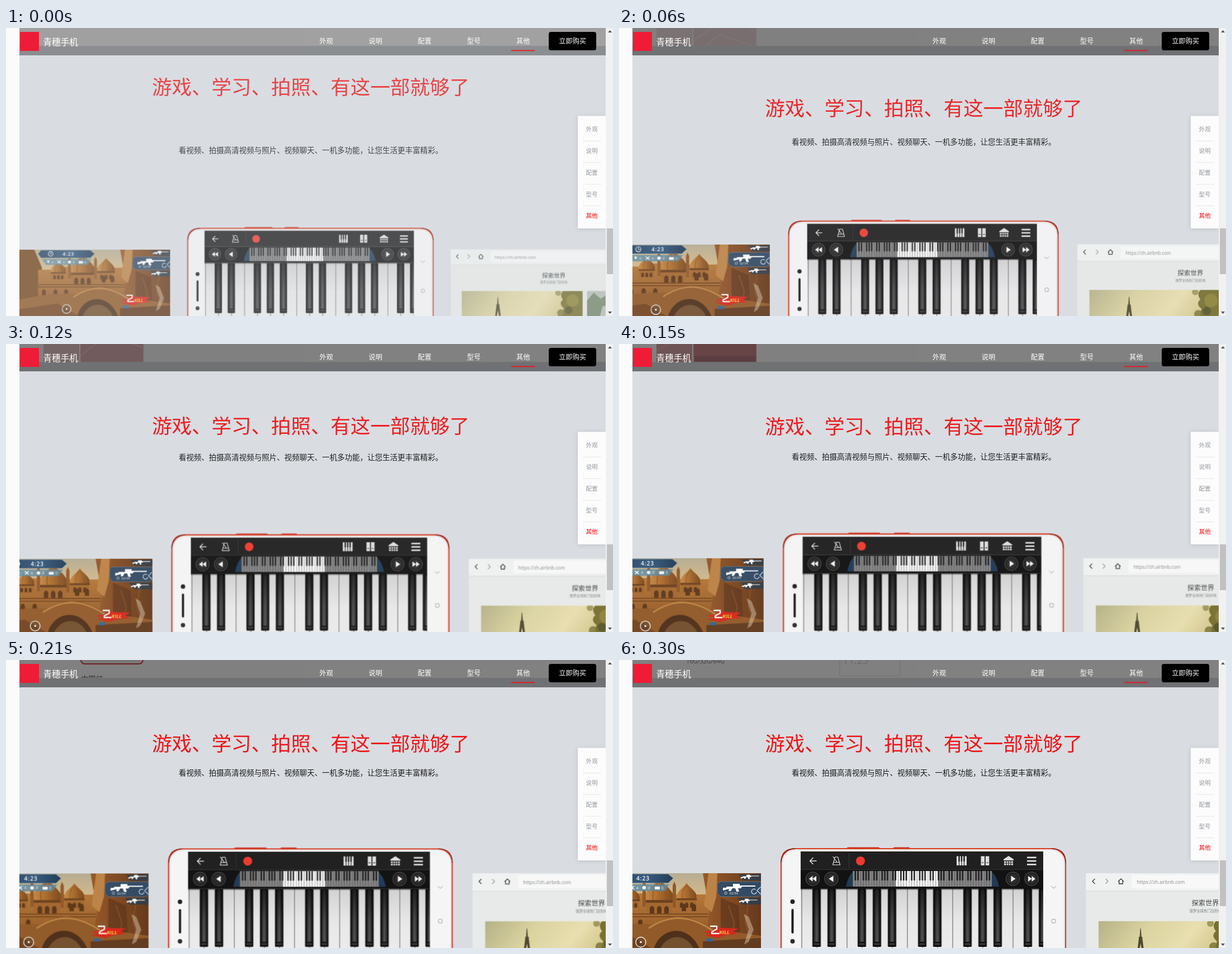
An HTML page that plays this animation: 1086 px wide and 516 px high, repeating every 330 ms.

```html
<!DOCTYPE html>
<html lang="zh-CN">
<head>
<meta charset="utf-8">
<title>手机介绍页</title>
<style>
html, body { margin: 0; width: 100%; height: 100%; overflow: hidden; background: #fbfbfb; }
svg { display: block; width: 1086px; height: 516px; }
text { font-family: "Noto Sans CJK SC", "Noto Sans CJK", "Noto Sans", sans-serif; }
.mid { text-anchor: middle; }
.nav { font-size: 12.2px; font-weight: 500; fill: #fff; }
.side { font-size: 10.5px; fill: #93989e; }
.latin { font-family: "Open Sans", "Noto Sans", sans-serif; }
.line { fill: none; stroke-linecap: round; stroke-linejoin: round; }

/* eleven held poses of 30 ms each */
.title, .sub, .devices, .shade, .past, .next { animation: 330ms step-end infinite; }
.title { animation-name: fade, title; }
.sub { animation-name: fade, sub; }
.devices { animation-name: fade, grow; transform-origin: 544.75px 490px; }
.shade { animation-name: shade; }
.past { animation-name: past; }
.next { animation-name: next; }

@keyframes fade {
  0% { opacity: .76 } 9.0909% { opacity: .83 } 18.1818% { opacity: .91 }
  27.2727% { opacity: .935 } 36.3636% { opacity: .955 } 45.4545% { opacity: .972 }
  54.5454% { opacity: .985 } 63.6363% { opacity: .995 } 72.7272%, 100% { opacity: 1 }
}
@keyframes title {
  0% { transform: translateY(-44px) } 9.0909% { transform: translateY(-12px) }
  18.1818% { transform: translateY(-6px) } 27.2727% { transform: translateY(-4.3px) }
  36.3636% { transform: translateY(-3px) } 45.4545% { transform: translateY(-1.9px) }
  54.5454% { transform: translateY(-1px) } 63.6363% { transform: translateY(-.4px) }
  72.7272%, 100% { transform: none }
}
@keyframes sub {
  0% { transform: translateY(17px) } 9.0909% { transform: translateY(4.7px) }
  18.1818% { transform: translateY(2.3px) } 27.2727% { transform: translateY(1.7px) }
  36.3636% { transform: translateY(1.2px) } 45.4545% { transform: translateY(.7px) }
  54.5454% { transform: translateY(.4px) } 63.6363% { transform: translateY(.2px) }
  72.7272%, 100% { transform: none }
}
@keyframes grow {
  0% { transform: scale(.863) } 9.0909% { transform: scale(.892) }
  18.1818% { transform: scale(.947) } 27.2727% { transform: scale(.962) }
  36.3636% { transform: scale(.974) } 45.4545% { transform: scale(.984) }
  54.5454% { transform: scale(.992) } 63.6363% { transform: scale(.997) }
  72.7272%, 100% { transform: scale(1) }
}
@keyframes shade {
  0% { opacity: .36 } 9.0909%, 100% { opacity: .49 }
}
@keyframes past {
  0%, 9.0909% { opacity: 0; transform: translateY(110px) }
  18.1818% { opacity: .16; transform: translateY(100px) }
  27.2727% { opacity: .24; transform: translateY(87px) }
  36.3636% { opacity: .34; transform: translateY(72px) }
  45.4545% { opacity: .55; transform: translateY(52px) }
  54.5454% { opacity: .78; transform: translateY(31px) }
  63.6363% { opacity: .9; transform: translateY(8px) }
  72.7272% { opacity: 1; transform: translateY(-15px) }
  81.8181% { opacity: 1; transform: translateY(-30px) }
  90.909%, 100% { opacity: 1; transform: translateY(-42px) }
}
@keyframes next {
  0% { opacity: 0 } 81.8181% { opacity: .5 } 90.909%, 100% { opacity: 1 }
}
</style>
</head>
<body>
<svg viewBox="0 0 1086 516">
<defs>
  <clipPath id="page"><path d="M24 32H1073V516H24z"/></clipPath>
  <clipPath id="above"><path d="M24 0H1073V32H24z"/></clipPath>
  <clipPath id="gameBox"><path d="M-70 382H254V580H-70z"/></clipPath>
  <clipPath id="photoBox"><path d="M858 468H1109V580H858z"/></clipPath>
  <linearGradient id="ebony">
    <stop offset="0" stop-color="#111"/><stop offset=".25" stop-color="#3a3a3a"/>
    <stop offset=".5" stop-color="#585858"/><stop offset=".75" stop-color="#3a3a3a"/>
    <stop offset="1" stop-color="#111"/>
  </linearGradient>
  <linearGradient id="ebonyTop" x2="0" y2="1">
    <stop offset="0" stop-color="#000" stop-opacity=".6"/><stop offset=".6" stop-color="#000" stop-opacity=".1"/>
    <stop offset="1" stop-color="#000" stop-opacity="0"/>
  </linearGradient>
  <linearGradient id="ivory" x2="0" y2="1">
    <stop offset="0" stop-color="#d2d2d3"/><stop offset=".3" stop-color="#e8e8e9"/>
    <stop offset="1" stop-color="#f2f2f2"/>
  </linearGradient>
  <linearGradient id="sky" x2="0" y2="1">
    <stop offset="0" stop-color="#b7ad92"/><stop offset=".2" stop-color="#d3b98a"/><stop offset=".4" stop-color="#b98144"/>
  </linearGradient>
  <linearGradient id="town" x2="0" y2="1">
    <stop offset="0" stop-color="#b57839"/><stop offset="1" stop-color="#8a5124"/>
  </linearGradient>
  <linearGradient id="domeFill">
    <stop offset="0" stop-color="#c58a48"/><stop offset=".4" stop-color="#b0702f"/><stop offset="1" stop-color="#7d4a20"/>
  </linearGradient>
  <linearGradient id="cliff">
    <stop offset="0" stop-color="#96592a"/><stop offset="1" stop-color="#66391b"/>
  </linearGradient>
  <linearGradient id="hud">
    <stop offset="0" stop-color="#2a4560"/><stop offset=".6" stop-color="#365a7e"/><stop offset="1" stop-color="#243c56"/>
  </linearGradient>
  <linearGradient id="dusk" y2=".35">
    <stop offset="0" stop-color="#b5b288"/><stop offset=".35" stop-color="#dbd3a0"/>
    <stop offset=".65" stop-color="#e9dfb0"/><stop offset="1" stop-color="#c8bb7c"/>
  </linearGradient>
  <g id="blackKey">
    <rect width="15" height="104" rx="1.5" fill="#0c0c0c"/>
    <rect x="2" width="11" height="95" rx="1.5" fill="url(#ebony)"/>
    <rect x="2" width="11" height="95" fill="url(#ebonyTop)"/>
    <path d="M2.5 97H12.5V101H2.5z" fill="#333"/>
  </g>
  <pattern id="octave" x="326.5" y="410" width="189" height="200" patternUnits="userSpaceOnUse">
    <rect width="189" height="200" fill="url(#ivory)"/>
    <path d="M.5 0V200M27.5 0V200M54.5 0V200M81.5 0V200M108.5 0V200M135.5 0V200M162.5 0V200" stroke="#58585a"/>
    <use href="#blackKey" x="19.5"/><use href="#blackKey" x="46.5"/>
    <use href="#blackKey" x="100.5"/><use href="#blackKey" x="127.5"/><use href="#blackKey" x="154.5"/>
  </pattern>
  <pattern id="smallOctave" x="418" y="378" width="33.6" height="40" patternUnits="userSpaceOnUse">
    <path d="M.2 0V40M4.8 0V40M9.6 0V40M14.4 0V40M19.2 0V40M24 0V40M28.8 0V40" stroke="#333" stroke-width=".6"/>
    <path d="M4.8 0V17M9.6 0V17M19.2 0V17M24 0V17M28.8 0V17" stroke="#181818" stroke-width="2.5"/>
  </pattern>
  <g id="knob">
    <circle r="12" fill="#1b1b1b" stroke="#444" stroke-width="1.6"/><circle r="9.5" fill="#2c2c2c"/>
  </g>
  <path id="rifle" d="M0 3H6V1H18V-4H30V-1H58V1H34L32 4H27L29 10H24L22 4H17L14 9H10L11 5L0 8z"/>
  <g id="dome">
    <path d="M-24 22C-31 4-10-4 0-19C10-4 31 4 24 22z" fill="url(#domeFill)"/>
    <path d="M-26 20H26V25H-26z" fill="#6e421f"/><path d="M-23 25H23V46H-23z" fill="#a4682f"/>
    <path d="M-11 20Q-14 2-1-12M11 20Q14 2 1-12" class="line" stroke="#8a5426" stroke-width="1.4"/>
    <path d="M-17 44V34Q-13 27-9 34V44M-4 44V34Q0 27 4 34V44M9 44V34Q13 27 17 34V44" fill="#5f381b"/>
  </g>
</defs>

<rect width="1086" height="516" fill="#fbfbfb"/>
<g clip-path="url(#above)">
  <g class="past">
    <rect x="67" y="-160" width="64" height="152" fill="#bd5f63"/>
    <path d="M67-40L131-74M67-80L131-130" stroke="#dc9792"/>
    <rect x="134" y="-200" width="111" height="199" rx="7" fill="#eceaea" stroke="#d62a30" stroke-width="2"/>
    <rect x="135" y="-190" width="109" height="159" fill="#a5252c"/>
    <path d="M135-52L180-88L244-66M135-78L195-120L244-92" class="line" stroke="#e58a74" stroke-width="1.4"/>
    <rect x="135" y="-31" width="109" height="21" fill="#78131f"/>
    <path d="M139-20H146V-15H139zM231-20H238V-15H231z" fill="#ddd"/>
    <text x="188" y="-15" class="mid" font-size="5" fill="#ddd">手机</text>
    <text x="154" y="31" class="mid" font-size="13.3" fill="#555">中国红</text>
    <text x="154.5" y="48" class="mid latin" font-size="10.8" fill="#777">16G/32G/64G</text>
  </g>
  <g class="next">
    <path d="M395 0V28H503V0" fill="none" stroke="#d8d8d8"/>
    <text x="423" y="7" class="mid latin" font-size="18" fill="#cfcfcf">11:23</text>
  </g>
</g>

<g clip-path="url(#page)">
  <path d="M24 32H1073V516H24z" fill="#d9dde2"/>
  <text class="title mid" x="545.2" y="163" font-size="35.5" fill="#f01416">游戏、学习、拍照、有这一部就够了</text>
  <text class="sub" x="309" y="206.5" font-size="13.5" fill="#161616">看视频、拍摄高清视频与照片、视频聊天、一机多功能，让您生活更丰富精彩。</text>

  <g class="devices">
    <!-- game -->
    <g clip-path="url(#gameBox)">
      <path d="M-70 382H254V580H-70z" fill="url(#sky)"/>
      <path d="M-70 382H-28L-12 420L-18 470L-30 520H-70z" fill="#76481f"/>
      <path d="M-20 424H10V418H46V426H100V420H170V520H-20z" fill="url(#town)"/>
      <use href="#dome" transform="translate(22 417) scale(.6)"/>
      <use href="#dome" transform="translate(121 413) scale(.7)"/>
      <use href="#dome" x="72" y="410"/>
      <path d="M42 402L45 396L48 402V442H42zM96 404L99 397L102 404V444H96z" fill="#94592a"/>
      <path d="M-20 455H160M-20 460H160" stroke="#6f421e" stroke-width="1.6"/>
      <path d="M-12 478V468Q-8 461-4 468V478M12 478V468Q16 461 20 468V478M34 478V468Q38 461 42 468V478M112 450V440Q116 433 120 440V450M130 450V440Q134 433 138 440V450" fill="#5f381b"/>
      <path d="M150 382H254V580H160L154 500L162 450z" fill="url(#cliff)"/>
      <path d="M160 382H176L174 424L166 452L152 440z" fill="#bd8346"/>
      <path d="M182 426L214 440L218 520H182z" fill="#57311a" opacity=".55"/>
      <path d="M196 440L206 470L200 520M232 430L226 470L240 520" class="line" stroke="#935d31" stroke-width="2" opacity=".6"/>
      <path d="M-70 488C0 474 20 472 60 474C100 450 130 458 170 482L254 494V580H-70z" fill="#925a29"/>
      <path d="M54 480C96 452 134 460 172 488" class="line" stroke="#bd8344" stroke-width="3"/>
      <path d="M60 528C66 476 130 466 148 528z" fill="#4f301a"/>
      <path d="M70 528C78 490 124 482 138 528z" fill="#73502e"/>
      <path d="M-70 508L20 494L64 520V580H-70z" fill="#75441f"/>
      <path d="M150 504L254 498V580H150z" fill="#633b1f"/>
      <path d="M150 487L168 484L172 478L186 480L214 481L204 486L212 491L190 493L176 498L152 493L166 490z" fill="#d8281c"/>
      <path d="M164 477H175V482L166 487V490H178" class="line" stroke="#fff" stroke-width="2.4"/>
      <text x="179" y="491" font-size="9.5" font-weight="700" font-style="italic" fill="#ffc33a" class="latin">KILL</text>
      <path d="M156 499H168V504H156z" fill="#33679a"/>
      <path d="M223 455L232 460L241 483L232 505L224 510L232 483z" fill="#e0d0b6" opacity=".45"/>
      <circle cx="39" cy="505.5" r="9" fill="#4b3a2c" fill-opacity=".4" stroke="#fff" stroke-width="1.3"/>
      <circle cx="39" cy="505.5" r="1.8" fill="#fff"/>
      <path d="M-20 391L-14 383.5H88L97 391L88 399.5H-14z" fill="url(#hud)" stroke="#7d9ab0" stroke-width=".6"/>
      <circle cx="6" cy="391" r="4.8" fill="none" stroke="#fff" stroke-width="1.2"/>
      <path d="M6 388V391.5H8.5" class="line" stroke="#fff"/>
      <text x="43" y="395" class="mid latin" font-size="10.2" font-weight="600" letter-spacing="1" fill="#fff">4:23</text>
      <path d="M-12 402H90L82 414H-4z" fill="#5e8ba4" opacity=".8"/>
      <g fill="#f3f6f6">
        <path d="M-2 405H4L1 411zM64 406H73V411H64z"/><path d="M20 405L27 411M27 405L20 411" stroke="#fff" stroke-width="1.6"/>
        <circle cx="45" cy="408" r="3.2"/>
        <text class="latin" font-size="6.5" y="410.5"><tspan x="8">0</tspan><tspan x="31">4</tspan><tspan x="52">0</tspan><tspan x="76">0</tspan></text>
      </g>
      <path d="M214 384H254V395H222zM212 426H254V438H220z" fill="#263d52" opacity=".75"/>
      <path d="M176 401L181 397H254V420L249 424H182L176 418z" fill="#2d4c6b" opacity=".9" stroke="#7895ab" stroke-width=".6"/>
      <g fill="#fff">
        <use href="#rifle" transform="translate(186 405)"/>
        <use href="#rifle" transform="translate(218 387) scale(.56)"/>
        <use href="#rifle" transform="translate(215 430) scale(.56)"/>
        <text x="197" y="420" font-size="6" class="latin">32/34</text>
      </g>
      <path d="M244 411A4.5 4.5 0 1 0 246 416M253 407L247 413L253 419" class="line" stroke="#dce6ee" stroke-width="1.2"/>
      <circle cx="191" cy="417.5" r="2.2" fill="none" stroke="#fff" stroke-width=".7"/>
    </g>

    <!-- phone -->
    <path d="M408 338V336.5Q408 335.5 410 335.5H464Q466 335.5 466 336.5V338zM491 338V336.5Q491 335.5 493 335.5H518Q520 335.5 520 336.5V338z" fill="#c92a1c"/>
    <rect x="290" y="338" width="509" height="250" rx="25" fill="#f5f5f6" stroke="#d63a22" stroke-width="2.2"/>
    <path d="M290 363Q290 338 315 338M774 338Q799 338 799 363" fill="none" stroke="#8e1f16" stroke-width="1.6"/>
    <rect x="292.5" y="340.5" width="504" height="250" rx="23" fill="none" stroke="#dcdcde" stroke-width="1"/>
    <circle cx="310.5" cy="433" r="4" fill="#202022"/><circle cx="310.5" cy="504" r="4" fill="#2c2c2e"/>
    <rect x="308.5" y="446" width="4" height="44" rx="2" fill="#1c1c1e"/>
    <path d="M773.5 405.5L777.5 409L781.5 405.5" class="line" stroke="#999" stroke-width="1"/>
    <rect x="774.3" y="464.5" width="6.6" height="6.6" rx="1.6" fill="none" stroke="#999" stroke-width="1"/>
    <path d="M325 343H759V376H325z" fill="#202020"/>
    <path d="M325 376H759V411H325z" fill="#121212"/>
    <path d="M325 375.5H759" stroke="#343434"/>
    <path d="M325 410H759V590H325z" fill="url(#octave)"/>
    <path d="M325 410H759V412H325z" fill="#000" opacity=".35"/>
    <path d="M411.5 346V373" stroke="#3a3a3a"/>
    <g class="line" stroke="#e4e4e4" stroke-width="1.5">
      <path d="M353 360H341.5M347 354.5L341.5 360L347 365.5"/>
      <path d="M386.5 353H391.5L395.5 367H382.5zM385 362.5H393.5M390 362L383 352.5" stroke-width="1.2"/>
    </g>
    <circle cx="432" cy="360" r="8" fill="#ee3a30"/>
    <g fill="#dedede">
      <path d="M604 351.5H622V368H604z"/>
      <path d="M647.5 351.5H654V368H647.5zM655.8 351.5H662.3V368H655.8z"/>
      <path d="M697 351L706 357V359H688V357zM689 360.5H705V367.5H689z"/>
      <path d="M730 352.5H746.5V355.3H730zM730 358.7H746.5V361.5H730zM730 364.9H746.5V367.7H730z"/>
    </g>
    <path d="M608.5 351V368M613 351V368M617.5 351V368" stroke="#202020" stroke-width="1.1"/>
    <path d="M608.5 351V361M613 351V361M617.5 351V361" stroke="#202020" stroke-width="2.4"/>
    <path d="M649 363H652.5M657.3 363H660.8M689 364H705M693 360V368M697 360V368M701 360V368" stroke="#202020" stroke-width="1.2"/>
    <use href="#knob" x="346.5" y="392"/><use href="#knob" x="380" y="392"/>
    <use href="#knob" x="704.5" y="392"/><use href="#knob" x="738" y="392"/>
    <path d="M346.5 387V397L340 392zM353 387V397L346.5 392zM383.5 386.5V397.5L375.5 392zM701.5 386.5V397.5L709.5 392zM732 387V397L738.5 392zM738.5 387V397L745 392z" fill="#f4f4f4"/>
    <path d="M406 406Q410 386 420 378H665Q676 386 680 406z" fill="#213a56"/>
    <path d="M418 378H667V406H418z" fill="#858585"/>
    <path d="M495 378H571V406H495z" fill="#fafafa"/>
    <path d="M418 378H667V406H418z" fill="url(#smallOctave)"/>

    <!-- browser -->
    <path d="M835.5 382H1170V580H835.5z" fill="#e7eae8"/>
    <path d="M835.5 382H1170V413.5H835.5z" fill="#f0f2f1"/>
    <rect x="917" y="385" width="260" height="24" rx="3" fill="#f7f8f7"/>
    <path d="M835.5 414H1170" stroke="#d5d9d7"/>
    <g class="line" stroke="#333" stroke-width="1.3">
      <path d="M851 392.5L847 396.5L851 400.5"/><path d="M871 392.5L875 396.5L871 400.5" stroke="#999"/>
      <path d="M893.5 396.5L898 392L902.5 396.5M894.7 396V401H901.3V396"/>
    </g>
    <text x="926.5" y="401.3" font-size="8.5" fill="#858a8a" class="latin">https://zh.airbnb.com</text>
    <text x="1049" y="440.3" class="mid" font-size="12.2" font-weight="500" fill="#3f4444">探索世界</text>
    <text x="1049" y="452" class="mid" font-size="6.3" fill="#7b8080">搜罗全球热门目的地</text>
    <g clip-path="url(#photoBox)">
      <path d="M858 468H1109V580H858z" fill="url(#dusk)"/>
      <path d="M932.6 481H933.6L934.8 496H936.4V499L939 520H935.5L933.2 508L931 520H927.5L930 499V496H931.5z" fill="#4f4a30"/>
      <g fill="#77702f">
        <path d="M1068 468H1109V530H1074Q1064 516 1070 504Q1058 494 1068 486Q1060 476 1068 468z"/>
        <circle cx="1058" cy="472" r="6" opacity=".6"/><circle cx="1064" cy="514" r="8" opacity=".8"/>
      </g>
      <circle cx="1088" cy="488" r="13" fill="#8d833a"/><circle cx="1080" cy="508" r="8" fill="#57552a"/>
    </g>
    <path d="M1118 468H1170V580H1118z" fill="#b6beb6"/>
    <path d="M1118 488L1132 472L1146 484L1170 470V496L1150 500L1142 530H1118z" fill="#74876a"/>
  </g>
</g>

<!-- header -->
<path class="shade" d="M24 0H1073V49H24z"/>
<rect x="25" y="7" width="34" height="34" fill="#ee1c36"/>
<text x="66.5" y="31.3" font-size="15.6" font-weight="500" fill="#fff">青穗手机</text>
<g class="nav mid">
  <text x="573" y="28">外观</text><text x="661" y="28">说明</text><text x="749" y="28">配置</text>
  <text x="837" y="28">型号</text><text x="925.3" y="28">其他</text>
  <rect x="971" y="7" width="85" height="33" rx="4" fill="#000"/>
  <text x="1013.7" y="28">立即购买</text>
</g>
<path d="M904 39.5H946V41.3H904z" fill="#f0141e"/>

<!-- side menu -->
<rect x="1023" y="157.5" width="50" height="201.5" fill="#fcfcfc" style="filter: drop-shadow(0 1px 4px rgba(0,0,0,.12))"/>
<path d="M1032 202.5H1065M1032 241H1065M1032 280H1065M1032 318.5H1065" stroke="#e6e6e6"/>
<g class="side mid">
  <text x="1048" y="185.3">外观</text><text x="1048" y="224">说明</text><text x="1048" y="262.8">配置</text>
  <text x="1048" y="301.7">型号</text><text x="1048" y="340.3" fill="#f00">其他</text>
</g>

<!-- scrollbar -->
<path d="M1073 0H1086V516H1073z" fill="#f1f1f1"/>
<path d="M1075 359H1086V441H1075z" fill="#c1c1c1"/>
<path d="M1077 8L1080.5 4L1084 8zM1077 508L1080.5 512L1084 508z" fill="#505050"/>
</svg>
</body>
</html>
```
